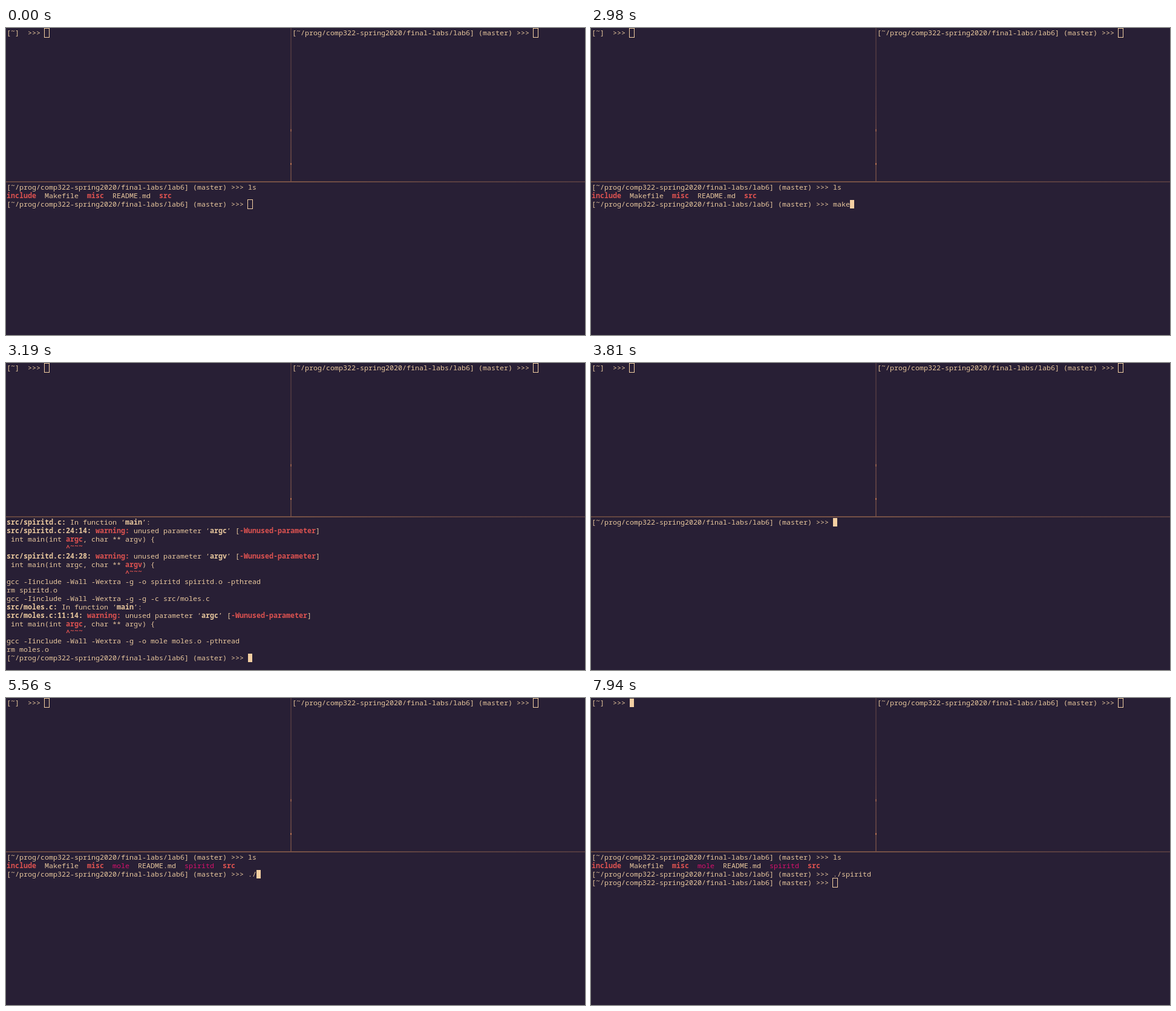
Animation of 957 by 507 pixels, one loop 8 s. Source, as an HTML page with a canvas:

```html
<!DOCTYPE html>
<html lang="en">
<head>
<meta charset="utf-8">
<title>Terminal session</title>
<style>
html, body { margin: 0; width: 100%; height: 100%; overflow: hidden; background: #281f35; }
canvas { display: block; width: 957px; height: 507px; }
</style>
</head>
<body>
<canvas id="stage" width="957" height="507"></canvas>
<script>
const ctx = document.getElementById("stage").getContext("2d");
const LOOP = 8000, CW = 7, LH = 14, ROWS = 17;
const BG = "#281f35", CREAM = "#e8c79d", CURSOR = "#f3cfa2";
const FACE = "11.667px 'Noto Sans Mono', 'DejaVu Sans Mono', monospace";
const OFF = 0, FILL = 1, BOX = 2;

// Styled runs are written |xtext| where x picks the style.
const STYLES = {
  n: ["", CREAM],
  b: ["bold ", CREAM],
  r: ["bold ", "#dc5250"],
  m: ["", "#d9106c"]
};

const PROMPT = "[~/prog/comp322-spring2020/final-labs/lab6] (master) >>> ";
const FLAGS = "gcc -Iinclude -Wall -Wextra -g ";

const inMain = file => `|bsrc/${file}:| In function ‘|bmain|’:`;
function warn(file, pos, arg) {
  const mark = name => name === arg ? `|r${name}|` : name;
  return [
    `|bsrc/${file}:${pos}:| |rwarning:| unused parameter ‘|b${arg}|’ [|r-Wunused-parameter|]`,
    ` int main(int ${mark("argc")}, char ** ${mark("argv")}) {`,
    " ".repeat(arg === "argc" ? 14 : 28) + "|r^~~~|"
  ];
}

const before = [PROMPT + "ls", "|rinclude|  Makefile  |rmisc|  README.md  |rsrc|"];
const compile = [...before, PROMPT + "make", FLAGS + "-g -c src/spiritd.c"];
const spirit = [...compile, inMain("spiritd.c"),
  ...warn("spiritd.c", "24:14", "argc"), ...warn("spiritd.c", "24:28", "argv")];
const linked = [...spirit, FLAGS + "-o spiritd spiritd.o -pthread", "rm spiritd.o",
  FLAGS + "-g -c src/moles.c"];
const built = [...linked, inMain("moles.c"), ...warn("moles.c", "11:14", "argc"),
  FLAGS + "-o mole moles.o -pthread", "rm moles.o"];
const after = [PROMPT + "ls",
  "|rinclude|  Makefile  |rmisc|  |mmole|  README.md  |mspiritd|  |rsrc|"];
const ran = [...after, PROMPT + "./spiritd"];

// time, finished rows, current row, cursor
const at = (time, rows, typed, cursor = FILL) => ({ time, rows, line: PROMPT + typed, cursor });
const busy = (time, rows) => ({ time, rows, line: "", cursor: FILL });
const steps = [
  at(0, before, "", BOX),
  at(290, before, ""), at(870, before, "", OFF),
  at(1470, before, ""), at(2070, before, "", OFF),
  at(2670, before, ""), at(2740, before, "m"), at(2820, before, "ma"),
  at(2900, before, "mak"), at(2980, before, "make"),
  busy(3070, compile), busy(3110, spirit), busy(3150, linked),
  at(3190, built, ""), at(3630, built, "c"), at(3720, built, "cl"),
  at(3810, [], ""), at(4320, [], "l"), at(4395, [], "ls"),
  at(4470, after, ""), at(5040, after, "", OFF),
  at(5320, after, ""), at(5360, after, "."), at(5560, after, "./"),
  at(5990, after, "./s"), at(6080, after, "./sp"), at(6270, after, "./spi"),
  at(6330, after, "./spiritd "), at(6900, after, "./spiritd ", OFF),
  at(7290, after, "./spiritd "),
  at(7330, ran, ""), at(7940, ran, "", BOX)
];

function text(str, x, top) {
  str.split("|").forEach((run, i) => {
    const styled = i % 2;
    const [weight, color] = STYLES[styled ? run[0] : "n"];
    ctx.font = weight + FACE;
    ctx.fillStyle = color;
    for (const ch of styled ? run.slice(1) : run) {
      // tildes sit near the top of the cell
      if (ch !== " ") ctx.fillText(ch, x, top + (ch === "~" ? 8 : 11));
      x += CW;
    }
  });
  return x;
}

function cursor(mode, x, y) {
  if (mode === FILL) {
    ctx.fillStyle = CURSOR;
    ctx.fillRect(x, y, CW, LH);
  } else if (mode === BOX) {
    ctx.strokeStyle = CURSOR;
    ctx.lineWidth = 1;
    ctx.strokeRect(x - 0.5, y - 0.5, CW + 1, LH + 1);
  }
}

function bar(x, y, w, h, colors) {
  const g = ctx.createLinearGradient(x, y, w > h ? x + w : x, w > h ? y : y + h);
  colors.forEach((c, i) => g.addColorStop(i / (colors.length - 1), c));
  ctx.fillStyle = g;
  ctx.fillRect(x, y, w, h);
}

function borders() {
  bar(470, 0, 2, 253, ["#49343f", "#49343f", "#573c42", "#614342"]);
  bar(0, 253, 957, 2, ["#614440", "#765146", "#765146", "#5b4041", "#523a40"]);
  ctx.fillStyle = "#8c5a4a";
  ctx.fillRect(470, 167, 2, 4);
  ctx.fillStyle = "#b5704f";
  ctx.fillRect(470, 223, 2, 3);
}

function draw(t) {
  const step = steps.findLast(s => s.time <= t);
  ctx.fillStyle = BG;
  ctx.fillRect(0, 0, 957, 507);
  borders();
  cursor(step.time === 7940 ? FILL : BOX, text("[~]  >>> ", 1, 1), 1);
  cursor(BOX, text(PROMPT, 473, 1), 1);
  const rows = [...step.rows, step.line].slice(-ROWS);
  let end = 1;
  rows.forEach((row, i) => { end = text(row, 1, 256 + i * LH); });
  cursor(step.cursor, end, 256 + (rows.length - 1) * LH);
}

function tick() {
  draw(performance.now() % LOOP);
  requestAnimationFrame(tick);
}
tick();
</script>
</body>
</html>
```
